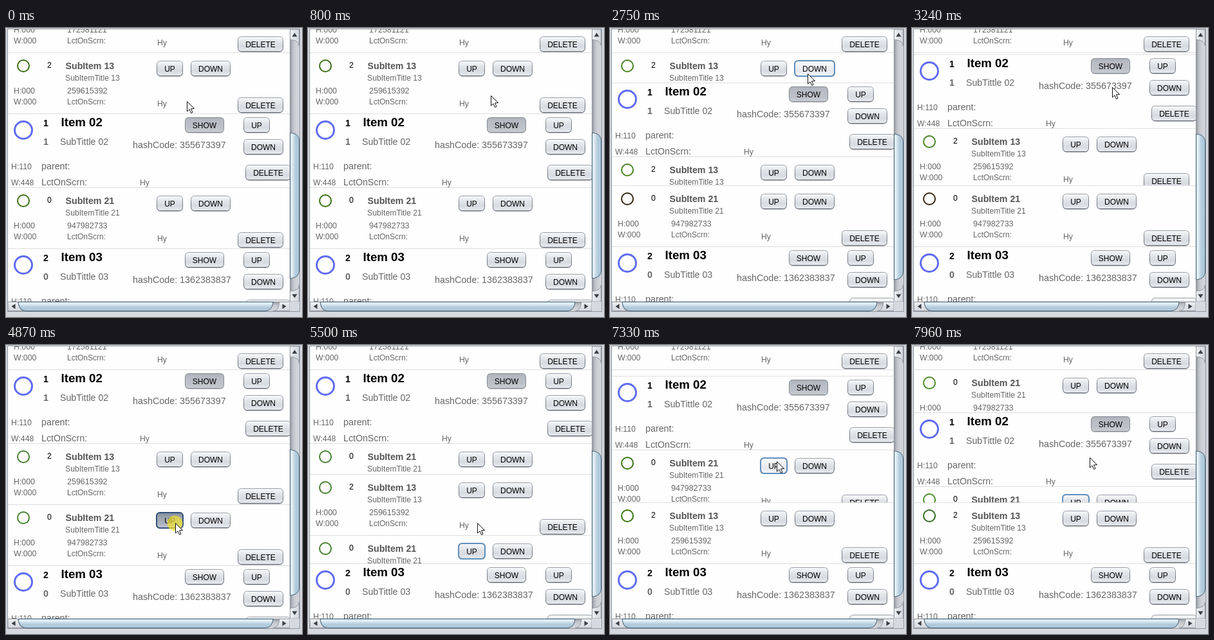
An HTML page with a canvas for the animation above (8 s loop, 460 by 450 pixels).

```html
<!DOCTYPE html>
<html lang="en">
<head>
<meta charset="utf-8">
<title>Reordering list items</title>
<style>
html, body { margin: 0; width: 460px; height: 450px; overflow: hidden; background: #d6d9df; }
canvas { display: block; }
</style>
</head>
<body>
<canvas id="stage" width="460" height="450"></canvas>
<script>
const ctx = document.getElementById('stage').getContext('2d');
const LOOP = 8000, STEP = 69;
const SUB_H = 95, ITEM_H = 115, MOVING_H = 92;
const FONT = '"Liberation Sans", Arial, sans-serif';
const GREY = '#666', DARK = '#555';

const above = { sub: true, n: 0, name: '12', code: '172581121' };
const sub13 = { sub: true, n: 2, name: '13', code: '259615392' };
const sub21 = { sub: true, n: 0, name: '21', code: '947982733' };
const item2 = { n: 1, kids: 1, name: '02', code: '355673397', shown: true };
const item3 = { n: 2, kids: 0, name: '03', code: '1362383837' };

// Each move shrinks the cell at `from` while a copy grows at `to`.
const moves = [
  { press: 2200, start: 2266, from: 0, to: 2, label: 'DOWN' },
  { press: 4870, start: 4965, from: 2, to: 1, label: 'UP' },
  { press: 7130, start: 7228, from: 1, to: 0, label: 'UP' }
];

// Moments at which the screen starts refreshing in even steps
const bursts = [0, 730, 1600, 2200, 4050, 4870, 6730, 7130];

// time, x, y
const path = [
  [0, 281, 114], [665, 281, 114], [799, 284, 105], [1535, 284, 105], [1669, 307, 69],
  [2700, 307, 69], [3235, 311, 92], [3700, 308, 140], [4050, 308, 142], [4300, 296, 190],
  [4533, 262, 281], [4610, 263, 277], [5750, 263, 277], [6112, 263, 213], [6250, 262, 158],
  [6319, 262, 186], [6729, 262, 186], [6730, 259, 181], [7500, 259, 181], [7958, 276, 175], [8000, 276, 175]
];

// time, ring colour of cell 13, ring colour of cell 21
const rings = [
  [0, '#3b6e12', '#3b6e12'], [2266, '#478420', '#33260f'], [3270, '#46812f', '#46812f'],
  [5900, '#4a7a17', '#4a7a17'], [7228, '#37750f', '#37750f'], [7900, '#2f6b1f', '#468f22']
];

let cursor, pressed, ring;

const last = (list, test) => list.filter(test).pop();

function cursorAt(t) {
  const i = Math.max(1, path.findIndex(k => k[0] >= t));
  const [t0, x0, y0] = path[i - 1], [t1, x1, y1] = path[i];
  const p = (t - t0) / (t1 - t0);
  return { x: Math.round(x0 + (x1 - x0) * p), y: Math.round(y0 + (y1 - y0) * p) };
}

function text(str, x, y, size, color = GREY, weight = '') {
  ctx.font = `${weight} ${size}px ${FONT}`;
  ctx.fillStyle = color;
  ctx.fillText(str, x, y);
}

function gradient(y0, y1, ...colors) {
  const g = ctx.createLinearGradient(0, y0, 0, y1);
  colors.forEach((c, i) => g.addColorStop(i / (colors.length - 1), c));
  return g;
}

function circle(x, y, r, color, width) {
  ctx.beginPath();
  ctx.arc(x, y, r, 0, 7);
  ctx.strokeStyle = color;
  ctx.lineWidth = width;
  ctx.stroke();
}

function box(x, y, w, h, r) {
  ctx.beginPath();
  ctx.roundRect(x, y, w, h, r);
}

function button(label, x, y, w, { on = false, focus = false } = {}) {
  const hover = cursor.x >= x && cursor.x < x + w && cursor.y >= y && cursor.y < y + 24;
  const down = hover && pressed;
  let fill = ['#fafbfc', '#e3e6ea', '#d7dae0', '#e9ecf0'];
  if (on) fill = ['#adb1b9', '#b9bdc5', '#bcc0c8', '#c8ccd3'];
  else if (down) fill = ['#858c99', '#9da4b0', '#a9b0bb', '#c3c9d2'];
  else if (hover) fill = ['#ffffff', '#eff1f4', '#e4e7ec', '#f6f8fa'];

  box(x + 1, y + 1.5, w - 2, 23.5, 5);
  ctx.fillStyle = 'rgba(80,85,95,.35)';
  ctx.fill();
  box(x + .5, y + .5, w - 1, 23, 5);
  ctx.fillStyle = gradient(y, y + 24, ...fill);
  ctx.fill();
  ctx.lineWidth = 1;
  ctx.strokeStyle = gradient(y, y + 24, on ? '#83878f' : '#9a9fa8', on ? '#83878f' : '#5d636d');
  ctx.stroke();
  if (focus) {
    box(x, y, w, 24, 5);
    ctx.lineWidth = 2;
    ctx.strokeStyle = down ? '#2f4f7d' : '#5f8fbd';
    ctx.stroke();
  }
  ctx.textAlign = 'center';
  text(label, x + w / 2, y + 17, 12, '#000');
  ctx.textAlign = 'left';
}

function drawSub(c, y, focus) {
  circle(27, y + 21, 9, c === sub21 ? ring[2] : ring[1], 2);
  text(c.n, 64, y + 24, 12.3, '#000');
  text('SubItem ' + c.name, 92.5, y + 26, 14.2, DARK, 'bold');
  text('SubItemTitle ' + c.name, 92, y + 44, 12.2);
  text('H:000', 12, y + 64, 12.3);
  text(c.code, 95, y + 64, 12.5);
  text('W:000', 12, y + 81, 12.3);
  text('LctOnScrn:', 95, y + 81, 12);
  text('Hy', 235, y + 84, 12.2);
  button('UP', 234, y + 13, 41, { focus: focus === 'UP' });
  button('DOWN', 287, y + 13, 62, { focus: focus === 'DOWN' });
  button('DELETE', 360, y + 70, 71);
}

function drawItem(c, y) {
  circle(27, y + 26, 13.5, '#5f6cf0', 3);
  text(c.n, 58, y + 20, 14.2, '#000', 'bold');
  text('Item ' + c.name, 85.5, y + 20, 18.7, '#000', 'bold');
  text(c.kids, 58, y + 49, 14.2, GREY, 'bold');
  text('SubTittle ' + c.name, 84, y + 49, 14.2);
  text('hashCode: ' + c.code, 197, y + 54, 14.3);
  text('H:110', 8, y + 87, 12.3);
  text('parent:', 55, y + 87, 14.3);
  text('W:448', 8, y + 112, 12.3);
  text('LctOnScrn:', 55, y + 112, 14.2);
  text('Hy', 208, y + 112, 12.2);
  button('SHOW', 278, y + 6, 61, { on: c.shown });
  button('UP', 369, y + 6, 41);
  button('DOWN', 369, y + 40, 62);
  button('DELETE', 372, y + 80, 71);
}

function drawCell(c, y, h, focus) {
  ctx.save();
  ctx.beginPath();
  ctx.rect(3, y, 438, h);
  ctx.clip();
  ctx.fillStyle = '#fefefe';
  ctx.fillRect(3, y, 438, h);
  ctx.fillStyle = '#dfdfdf';
  ctx.fillRect(3, y, 438, 1);
  (c.sub ? drawSub : drawItem)(c, y, focus);
  ctx.restore();
}

// Rows below the first one, with their current heights
function layout(t) {
  const row = cell => ({ cell, h: cell.sub ? SUB_H : ITEM_H });
  const rows = [sub13, item2, sub21, item3].map(row);
  let moving = false;
  for (const m of moves) {
    if (t < m.press) break;
    const old = rows[m.from];
    if (t < m.start) {
      old.focus = m.label;
      break;
    }
    const p = (t - m.start) / 1000, copy = row(old.cell);
    rows.splice(m.to, 0, copy);
    if (p >= 1) {
      rows.splice(rows.indexOf(old), 1);
      continue;
    }
    copy.h = Math.round(MOVING_H * p);
    old.h = MOVING_H - copy.h;
    old.focus = m.label;
    moving = true;
  }
  return { rows, moving };
}

function fillShape(draw, fill, stroke) {
  ctx.beginPath();
  draw();
  ctx.closePath();
  ctx.fillStyle = fill;
  ctx.fill();
  ctx.strokeStyle = stroke;
  ctx.lineWidth = 1;
  ctx.stroke();
}

// Local axes: u along the bar, v from its inner to its outer edge
function scrollbar(len, from, to) {
  ctx.fillStyle = gradient(0, 15, '#8d9199', '#bfc2c8', '#d0d3d8', '#cfd2d7');
  ctx.fillRect(0, 0, len, 15);
  for (const [base, dir] of [[0, 1], [len, -1]]) {
    const u = d => base + dir * d;
    fillShape(() => {
      ctx.moveTo(u(0), .5);
      ctx.lineTo(u(16), .5);
      ctx.bezierCurveTo(u(17), 9, u(20), 14.5, u(26), 14.5);
      ctx.lineTo(u(0), 14.5);
    }, gradient(0, 15, '#f1f2f4', '#e0e3e7', '#d3d6dc'), '#8f949d');
    ctx.beginPath();
    ctx.moveTo(u(5.5), 7.5);
    ctx.lineTo(u(11.5), 3.5);
    ctx.lineTo(u(11.5), 11.5);
    ctx.fillStyle = '#3a3f47';
    ctx.fill();
  }
  fillShape(() => {
    ctx.moveTo(from, .5);
    ctx.bezierCurveTo(from + 1, 9, from + 4, 14.5, from + 13, 14.5);
    ctx.lineTo(to - 13, 14.5);
    ctx.bezierCurveTo(to - 4, 14.5, to - 1, 9, to, .5);
  }, gradient(0, 15, '#d5e3ee', '#e3eef6', '#bdd3e2', '#a9c5d8', '#c5dcea'), '#3f5a70');
}

function drawFrame(moving) {
  const shift = moving ? 2 : 0;
  ctx.save();
  ctx.transform(0, 1, 1, 0, 441, 2);
  scrollbar(424, 161 + shift, 388 + shift);
  ctx.restore();
  ctx.save();
  ctx.translate(3, 426);
  scrollbar(438, 16, 412);
  ctx.restore();
  ctx.fillStyle = '#d6d9df';
  ctx.fillRect(441, 426, 16, 15);
  ctx.strokeStyle = '#9297a1';
  ctx.lineWidth = 1;
  ctx.strokeRect(2.5, 1.5, 454, 440);
}

function drawCursor() {
  ctx.save();
  ctx.translate(cursor.x, cursor.y);
  if (pressed) {
    ctx.beginPath();
    ctx.arc(-.5, .5, 12, 0, 7);
    ctx.fillStyle = 'rgba(238,224,50,.72)';
    ctx.fill();
  }
  fillShape(() => {
    const tip = [[.5, .5], [.5, 16], [4, 12.8], [6.6, 18.5], [9, 17.4], [6.5, 11.8], [11.5, 11.5]];
    tip.forEach(p => ctx.lineTo(...p));
  }, '#fff', '#111');
  ctx.restore();
}

function draw(now) {
  const time = now % LOOP;
  const base = last(bursts, b => b <= time);
  const t = Math.min(LOOP, base + Math.floor((time - base + 8) / STEP) * STEP);
  cursor = cursorAt(t);
  pressed = moves.some(m => t >= m.press && t < m.start && t < m.press + STEP);
  ring = last(rings, r => r[0] <= t);
  const { rows, moving } = layout(t);

  ctx.fillStyle = '#d6d9df';
  ctx.fillRect(0, 0, 460, 450);
  ctx.save();
  ctx.beginPath();
  ctx.rect(3, 2, 438, 424);
  ctx.clip();
  drawCell(above, -57, SUB_H);
  let y = 38;
  for (const { cell, h, focus } of rows) {
    drawCell(cell, y, h, focus);
    y += h;
  }
  ctx.restore();
  drawFrame(moving);
  drawCursor();
}

const begin = performance.now();
function tick() {
  draw(performance.now() - begin);
  requestAnimationFrame(tick);
}
tick();
</script>
</body>
</html>
```
